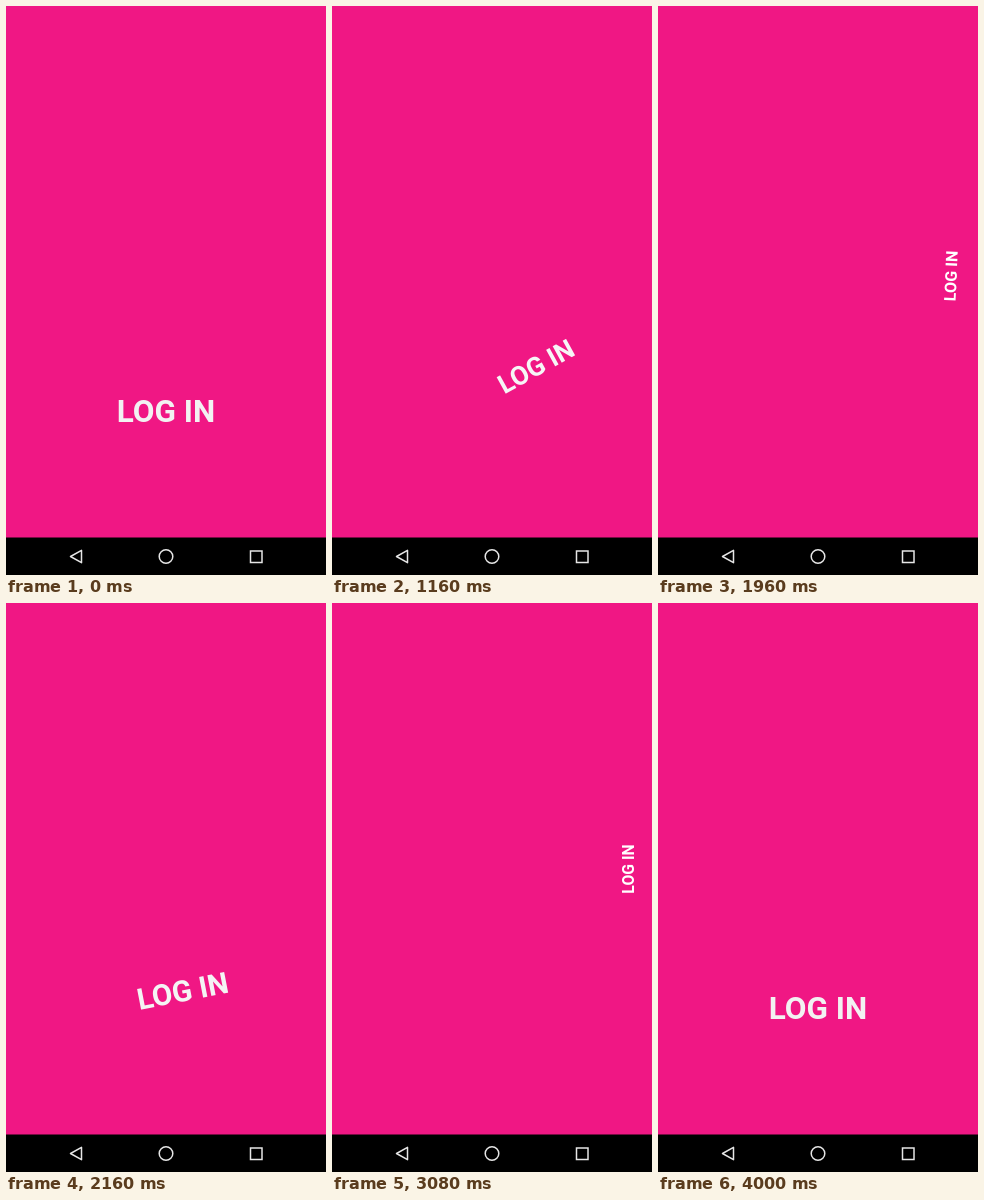
An HTML page that plays this animation: 320 px wide and 569 px high, repeating every 4.04 s.

```html
<!DOCTYPE html>
<html lang="en">
<head>
<meta charset="utf-8">
<title>Log in button</title>
<style>
  html, body { margin: 0; width: 100%; height: 100%; overflow: hidden; background: #f01784; }
  svg { display: block; width: 100%; height: 100%; }
  text { font: 700 31.5px Roboto, sans-serif; text-anchor: middle; }
</style>
</head>
<body>
<svg viewBox="0 0 320 569">
  <defs>
    <radialGradient id="glow">
      <stop offset="0.7" stop-color="#fff" stop-opacity="0.65"/>
      <stop offset="0.8" stop-color="#fff" stop-opacity="0.3"/>
      <stop offset="1" stop-color="#fff" stop-opacity="0"/>
    </radialGradient>
  </defs>
  <rect width="320" height="569" fill="#f01784"/>
  <text id="label" y="11.2">LOG IN</text>
  <circle id="dot" r="10.5" fill="url(#glow)"/>
  <rect y="531.5" width="320" height="37.5"/>
  <g fill="none" stroke="#e6e6e6" stroke-width="1.5">
    <path d="M64.5 550.5 75.5 544.3V556.7Z" stroke-linejoin="round"/>
    <circle cx="160" cy="550.5" r="6.8"/>
    <rect x="244.5" y="545" width="11.5" height="11.5"/>
  </g>
</svg>
<script>
  const LOOP = 4040, STEP = 40, MOVE = 300;
  const label = document.getElementById('label');
  const dot = document.getElementById('dot');

  // Each tap shows the touch dot, then moves the label to the other pose.
  const taps = [
    { down: 960, start: 1045, to: 1, x: 180.5, y: 415.5 },
    { down: 1840, start: 1928, to: 0, x: 298.5, y: 266 },
    { down: 2720, start: 2768, to: 1, x: 170, y: 411.5 },
    { down: 3440, start: 3528, to: 0, x: 298.5, y: 266 }
  ];

  const mix = (a, b, p) => a + (b - a) * p;
  const ease = u => 0.5 - 0.5 * Math.cos(Math.PI * Math.min(1, Math.max(0, u)));

  function draw(time) {
    const t = Math.floor((time % LOOP) / STEP) * STEP;
    let p = 0;
    for (const tap of taps) {
      if (t >= tap.start) p = mix(1 - tap.to, tap.to, ease((t - tap.start) / MOVE));
    }
    const x = mix(160, 296.7, p), y = mix(404.7, 266, p);
    label.setAttribute('transform',
      `translate(${x} ${y}) rotate(${-90 * p}) scale(${mix(1, 0.5, p)})`);
    const tone = Math.round(mix(242, 255, p));
    label.setAttribute('fill', `rgb(${tone},${tone},${tone})`);

    const touch = taps.find(tap => t >= tap.down && t < tap.start);
    dot.setAttribute('visibility', touch ? 'visible' : 'hidden');
    if (touch) dot.setAttribute('transform', `translate(${touch.x} ${touch.y})`);
  }

  const begin = performance.now();
  function tick() {
    draw(performance.now() - begin);
    requestAnimationFrame(tick);
  }
  tick();
</script>
</body>
</html>
```
